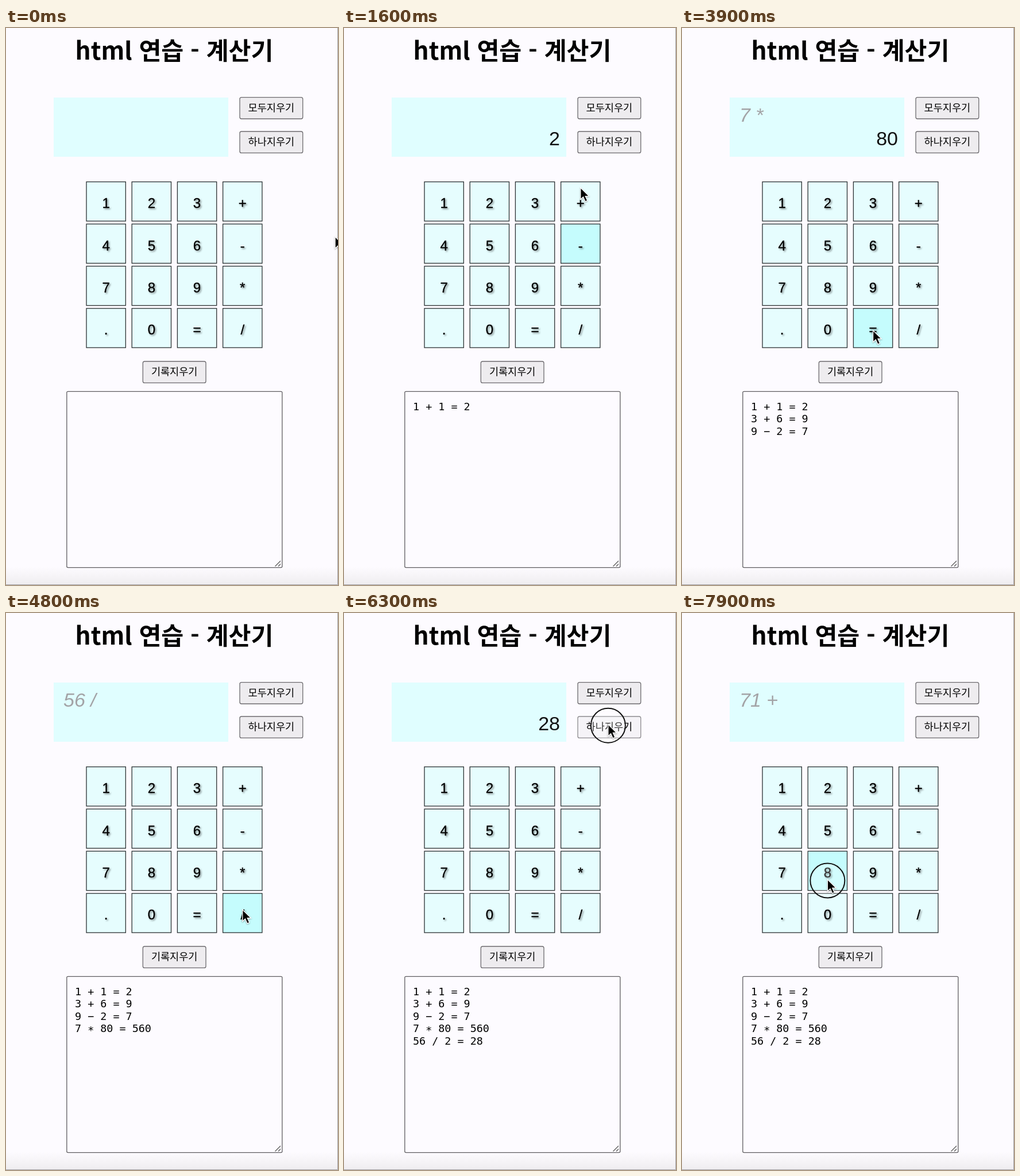
These frames come from a looping animation (578x969 px, 8 s). An HTML page:

```html
<!DOCTYPE html>
<html lang="ko">
<head>
<meta charset="utf-8">
<title>계산기</title>
<style>
  html, body { margin: 0; width: 100%; height: 100%; overflow: hidden; background: #fdfbff; }
  svg { display: block; width: 578px; height: 969px; }
  text { white-space: pre; fill: #000; }
  .title { font: 700 42.3px "Noto Sans CJK KR", "Noto Sans CJK", sans-serif; text-anchor: middle; }
  .btn rect { fill: #eeecef; stroke: #6c6a6e; stroke-width: 1.3; }
  .btn.hover rect { fill: #e5e3e7; stroke: #555; }
  .btn.active rect { fill: #f5f3f7; stroke: #8d8b8f; }
  .btn text { font: 17.5px "Noto Sans CJK KR", "Noto Sans CJK", sans-serif; text-anchor: middle; }
  .cell rect { fill: #e6fdfe; stroke: #2c3233; stroke-width: 1.3; }
  .cell.hover rect { fill: #c5fcfd; }
  .cell text {
    font: 24px "Liberation Sans", Arial, sans-serif; text-anchor: middle;
    stroke: #000; stroke-width: .35; filter: drop-shadow(2px 2px 1.5px rgba(0, 0, 0, .42));
  }
  .value, .upper { font: 34px "Liberation Sans", Arial, sans-serif; }
  .value { text-anchor: end; fill: #111; }
  .upper { font-style: italic; fill: #a3a3a6; }
  .log { font: 18.4px "DejaVu Sans Mono", monospace; }
  .ring { fill: rgba(255, 255, 255, .22); stroke: #111; stroke-width: 2; }
  .arrow { fill: #000; stroke: #fff; stroke-width: 1.3; filter: drop-shadow(0 1px 1px rgba(0, 0, 0, .35)); }
</style>
</head>
<body>
<svg viewBox="0 0 578 969">
  <defs>
    <linearGradient id="foot" x2="0" y2="1">
      <stop offset="0" stop-color="#fdfbff"/>
      <stop offset="1" stop-color="#efedf0"/>
    </linearGradient>
  </defs>
  <rect y="938" width="578" height="30" fill="url(#foot)"/>
  <path d="M577.5 0V968.5H0" fill="none" stroke="#a09ea2"/>
  <text class="title" x="293" y="55">html 연습 - 계산기</text>
  <rect x="83" y="121" width="304" height="103" fill="#e0feff"/>
  <text class="upper" x="100" y="163"></text>
  <text class="value" x="376" y="204"></text>
  <g id="keys"></g>
  <rect x="105.8" y="632.3" width="375" height="306.3" rx="2" fill="#fdfbff" stroke="#5f5d61" stroke-width="1.3"/>
  <path d="M468.5 936.5l9.5-9.5M474 936.5l4-4" stroke="#555" stroke-width="1.2"/>
  <g id="lines"></g>
  <circle class="ring" r="30"/>
  <path class="arrow" d="M0 0V20.5L4.7 16.2 8.3 24.2 12 22.6 8.5 14.8H14.8Z"/>
</svg>
<script>
const LOOP = 8000, HOLD = 110, HOVER_LAG = 30;
const $ = s => document.querySelector(s);

function make(parent, tag, attrs, text = '') {
  const el = document.createElementNS('http://www.w3.org/2000/svg', tag);
  for (const k in attrs) el.setAttribute(k, attrs[k]);
  el.textContent = text;
  return parent.appendChild(el);
}

const keys = {};
function addKey(id, label, cls, x, y, w, h, rx, baseline) {
  const g = make($('#keys'), 'g', { class: cls });
  make(g, 'rect', { x, y, width: w, height: h, rx });
  make(g, 'text', { x: x + w / 2, y: y + baseline }, label);
  keys[id] = { g, cls, x, y, w, h };
}
[...'123+456-789*.0=/'].forEach((c, i) =>
  addKey(c, c, 'cell', 140 + 79.2 * (i % 4), 267.6 + 73.4 * (i >> 2), 68.3, 68.3, 0, 45.5));
addKey('AC', '모두지우기', 'btn', 407, 120.6, 109.7, 37.4, 3, 24);
addKey('CE', '하나지우기', 'btn', 407, 180, 109.7, 37.4, 3, 24);
addKey('log', '기록지우기', 'btn', 238.3, 580, 109.7, 37.4, 3, 24);

const lines = Array.from({ length: 5 }, (_, i) =>
  make($('#lines'), 'text', { class: 'log', x: 120, y: 664.7 + 21.5 * i }));

// leave, arrive, key, press time (0 = pass over), offset from key centre
const moves = [
  [50, 300, '1', 330], [480, 650, '+', 680], [820, 980, '1', 990], [1110, 1160, '=', 1170],
  [1530, 1570, '-', 0, 0, 0], [1570, 1600, '+', 0, 0, -24],
  [1650, 1950, 'AC', 2030], [2200, 2350, '3', 2370], [2480, 2530, '+', 2535],
  [2645, 2665, '6', 2670, 16, 7], [2800, 2860, '=', 2870], [2980, 3025, '-', 3030],
  [3140, 3185, '2', 3190], [3300, 3325, '=', 3330], [3440, 3475, '*', 3480],
  [3590, 3598, '8', 3600], [3710, 3714, '0', 3715], [3825, 3865, '=', 3920, 0, 4],
  [4050, 4290, 'CE', 4330], [4460, 4640, '/', 4670, 0, -6], [4830, 4940, '2', 4960],
  [5090, 5210, '=', 5230], [5530, 5830, 'AC', 0, -6, 8], [5860, 5980, 'CE', 6290],
  [6640, 6650, 'CE', 6660], [6780, 6930, '7', 6960], [7080, 7130, '1', 7150],
  [7270, 7320, '+', 7340], [7620, 7860, '8', 7895, 0, 15]
].map(([leave, arrive, key, press, dx = 0, dy = keys[key].cls === 'btn' ? -6 : 6]) => {
  const k = keys[key];
  if (key === 'CE') { dx = -2; dy = -5; }
  return { leave, arrive, key, press, x: k.x + k.w / 2 + dx, y: k.y + k.h / 2 + dy };
});

function cursorAt(t) {
  let p = { x: 573, y: 363 };
  for (const m of moves) {
    if (t < m.leave) break;
    const u = Math.min(1, (t - m.leave) / (m.arrive - m.leave)), e = u * u * (3 - 2 * u);
    p = { x: p.x + (m.x - p.x) * e, y: p.y + (m.y - p.y) * e };
  }
  return p;
}

const ops = { '+': (a, b) => a + b, '-': (a, b) => a - b, '*': (a, b) => a * b, '/': (a, b) => a / b };

function calcAt(t) {
  let upper = '', value = '';
  const log = [];
  for (const { key, press } of moves) {
    if (!press || t < press + HOLD) continue;
    if (key === 'AC') upper = value = '';
    else if (key === 'CE') value = value.slice(0, -1);
    else if (key === '=') {
      const [a, op] = upper.split(' '), r = ops[op](+a, +value);
      log.push(`${a} ${op} ${value} = ${r}`.replace('-', '−').replace('*', '∗'));
      upper = '';
      value = String(r);
    } else if (ops[key]) {
      upper = value + ' ' + key;
      value = '';
    } else value += key;
  }
  return { upper, value, log };
}

function draw(t) {
  const p = cursorAt(t), h = cursorAt(t - HOVER_LAG), s = calcAt(t);
  const pressed = moves.find(m => m.press && t >= m.press && t < m.press + HOLD);
  for (const id in keys) {
    const k = keys[id];
    const over = h.x >= k.x && h.x <= k.x + k.w && h.y >= k.y && h.y <= k.y + k.h;
    const active = pressed && pressed.key === id;
    k.g.setAttribute('class', k.cls + (over ? ' hover' : '') + (active ? ' active' : ''));
  }
  $('.upper').textContent = s.upper;
  $('.value').textContent = s.value;
  lines.forEach((el, i) => el.textContent = s.log[i] || '');
  $('.arrow').setAttribute('transform', `translate(${p.x} ${p.y})`);
  $('.ring').setAttribute('transform', `translate(${p.x} ${p.y + 2})`);
  $('.ring').style.display = pressed ? '' : 'none';
}

const start = performance.now();
function tick() {
  draw((performance.now() - start) % LOOP);
  requestAnimationFrame(tick);
}
tick();
</script>
</body>
</html>
```
